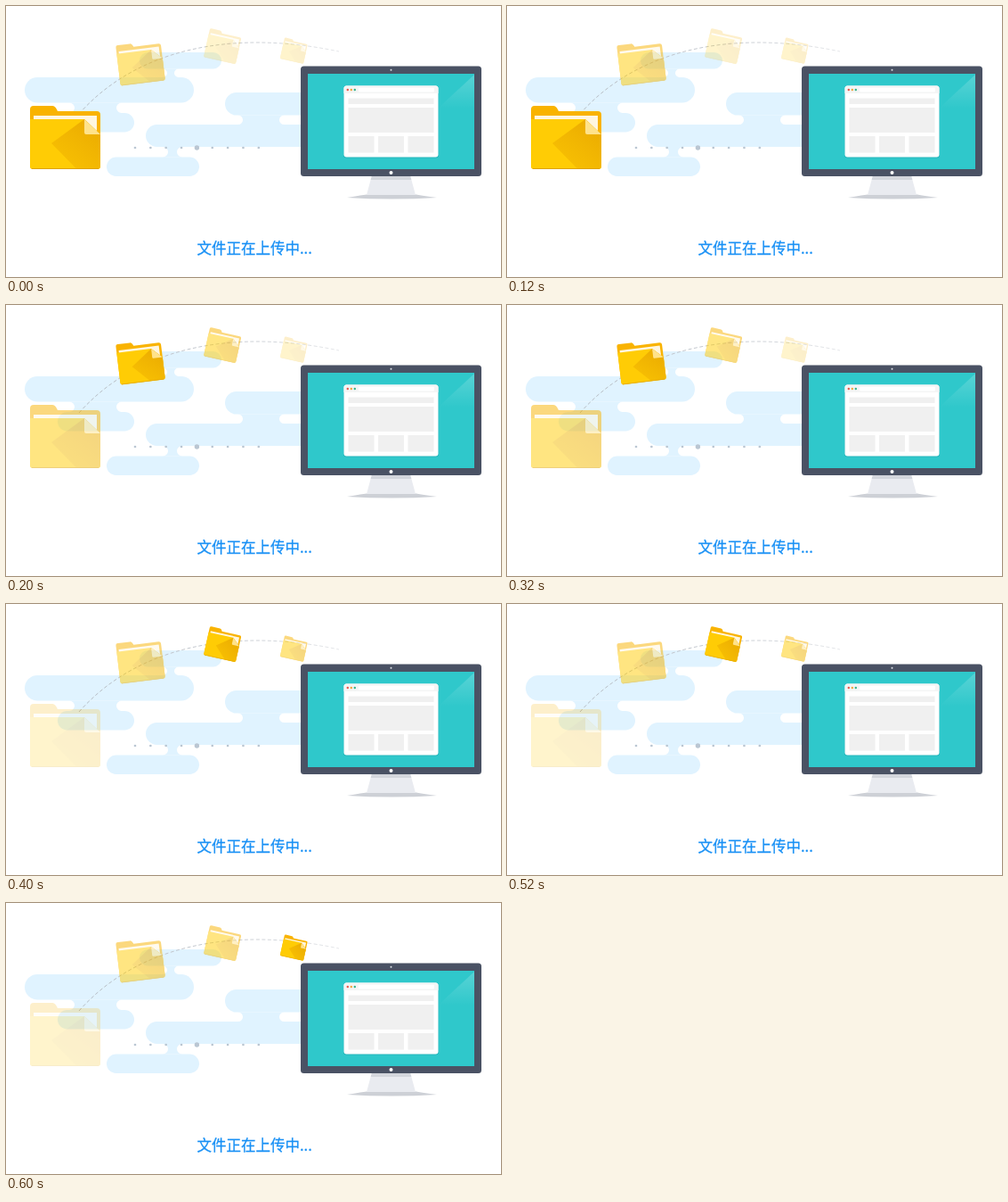
An HTML page that plays this animation: 556 by 304 pixels, repeating every 800 ms.

```html
<!DOCTYPE html>
<html lang="zh">
<head>
<meta charset="utf-8">
<title>文件正在上传中</title>
<style>
html, body { margin: 0; width: 100%; height: 100%; overflow: hidden; background: #fff; }
svg { display: block; width: 556px; height: 304px; }
text { font: 500 16.5px "Noto Sans CJK SC", "Noto Sans CJK", sans-serif; fill: #1890f5; stroke: #1890f5; stroke-width: .3px; }
</style>
</head>
<body>
<svg viewBox="0 0 556 304">
  <defs>
    <linearGradient id="shade" x1="1" y1="0" x2=".2" y2="1">
      <stop offset="0" stop-color="#e5a100" stop-opacity=".85"/>
      <stop offset="1" stop-color="#f0b400" stop-opacity=".5"/>
    </linearGradient>
    <linearGradient id="trail" gradientUnits="userSpaceOnUse" x1="82" x2="376" y1="0" y2="0">
      <stop offset="0" stop-color="#b4bac2"/>
      <stop offset=".6" stop-color="#c8ccd2"/>
      <stop offset="1" stop-color="#e6e8eb"/>
    </linearGradient>
    <linearGradient id="glare" x1="0" y1="0" x2="0" y2="1">
      <stop offset="0" stop-color="#fff" stop-opacity=".2"/>
      <stop offset="1" stop-color="#fff" stop-opacity="0"/>
    </linearGradient>
    <g id="folder">
      <path d="M0 4Q0 0 4 0H25Q28 0 30 4L31 6H75Q79 6 79 10V67Q79 71 75 71H4Q0 71 0 67Z" fill="#f9b300"/>
      <path d="M4 11H75V40H4Z" fill="#fff6df"/>
      <path d="M0 15H61L79 32V68Q79 71 76 71H3Q0 71 0 68Z" fill="#ffcc05"/>
      <path d="M61 15L24 42L52 70.5H76Q79 70.5 79 67.5V32Z" fill="url(#shade)"/>
      <path d="M61 15V30Q61 32 63 32H79Z" fill="#ffe28a"/>
      <path d="M2 70.5H77" stroke="#dfa200"/>
    </g>
  </defs>

  <g id="clouds" fill="#e0f3ff"></g>
  <path d="M82 121C145 50 250 25 374 51" fill="none" stroke="url(#trail)" stroke-dasharray="4 2.5"/>
  <g id="dots" fill="#bac6d2"></g>
  <g id="folders"></g>

  <path d="M383 215Q400 212 408 211H458Q468 213 484 215Q433 218 383 215Z" fill="#cdd0d6"/>
  <path d="M411 190H454L460 212H405Z" fill="#e9ebf0"/>
  <path d="M411 190H454L455.300 195H409.700Z" fill="#d3d6dc"/>
  <rect x="331" y="67.500" width="203" height="123.500" rx="3.500" fill="#4a5264"/>
  <rect x="339" y="76" width="187" height="107" fill="#2fc8cb"/>
  <path d="M526 77V115H485Z" fill="url(#glare)"/>
  <circle cx="432.500" cy="71.700" r="1" fill="#dfe3e8"/>
  <circle cx="432.500" cy="187" r="2" fill="#fff"/>
  <rect x="379" y="90" width="107" height="80.500" rx="3" fill="#1f9fa5" opacity=".4"/>
  <rect x="379.500" y="89.500" width="106" height="80" rx="3" fill="#fff"/>
  <path d="M379.500 98V92.500Q379.500 89.500 382.500 89.500H482.500Q485.500 89.500 485.500 92.500V98Z" fill="#f4f5f5"/>
  <rect x="396" y="91.800" width="85" height="4.600" rx="1" fill="#fff"/>
  <circle cx="383.800" cy="94" r="1.200" fill="#e9564b"/>
  <circle cx="387.800" cy="94" r="1.200" fill="#f0a63c"/>
  <circle cx="391.800" cy="94" r="1.200" fill="#35b48c"/>
  <path d="M384.500 103.500H480.500V110H384.500ZM384.500 114H480.500V142H384.500ZM384.500 146H413.500V164.500H384.500ZM418 146H447V164.500H418ZM451.500 146H480.500V164.500H451.500Z" fill="#f0f0f0"/>

  <text x="214.500" y="277.500">文件正在上传中...</text>
</svg>
<script>
const $ = id => document.getElementById(id);

const pill = (x1, x2, y1, y2) =>
  `<rect x="${x1}" y="${y1}" width="${x2 - x1}" height="${y2 - y1}" rx="${(y2 - y1) / 2}"/>`;

// Bridge between two pills, with a round notch on each side
const neck = (x1, x2, y1, y2) => {
  const r = (y2 - y1) / 2, arc = `A${r} ${r} 0 0 1`;
  return `<path d="M${x1 - r} ${y1}${arc} ${x1 - r} ${y2}H${x2 + r}${arc} ${x2 + r} ${y1}Z"/>`;
};

$("clouds").innerHTML =
  pill(150, 242, 52, 70.5) + neck(181, 189, 70.5, 80) + pill(21, 211, 80, 108.5) +
  neck(77, 124, 108.5, 120) + pill(58, 144, 120, 141.5) +
  pill(246, 370, 97, 122.5) + neck(266, 307, 122.5, 133) + pill(157, 370, 133, 158) +
  neck(182, 192, 158, 169.5) + pill(113, 217, 169.5, 191);

for (let i = 0; i < 9; i++)
  $("dots").innerHTML += `<circle cx="${145 + i * 17.35}" cy="159" r="${i == 4 ? 2.7 : 1.35}"/>`;

// Centre, scale, angle, and opacity in each of the four steps
const folders = [
  [66.5, 147.5, 1, 0, [1, .5, .2, .2]],
  [151, 63.8, .64, -7, [.5, 1, .5, .5]],
  [243.5, 45, .465, 12.5, [.2, .5, 1, .5]],
  [323.5, 50, .34, 12.5, [.2, .2, .5, 1]]
];
$("folders").innerHTML = folders.map(([x, y, s, a]) =>
  `<use href="#folder" transform="translate(${x} ${y}) rotate(${a}) scale(${s}) translate(-39.5 -35.5)"/>`).join("");

const start = performance.now();
function draw(now) {
  const step = Math.floor(Math.max(0, now - start) / 200) % 4;
  folders.forEach((f, i) => $("folders").children[i].setAttribute("opacity", f[4][step]));
  requestAnimationFrame(draw);
}
draw(start);
</script>
</body>
</html>
```
